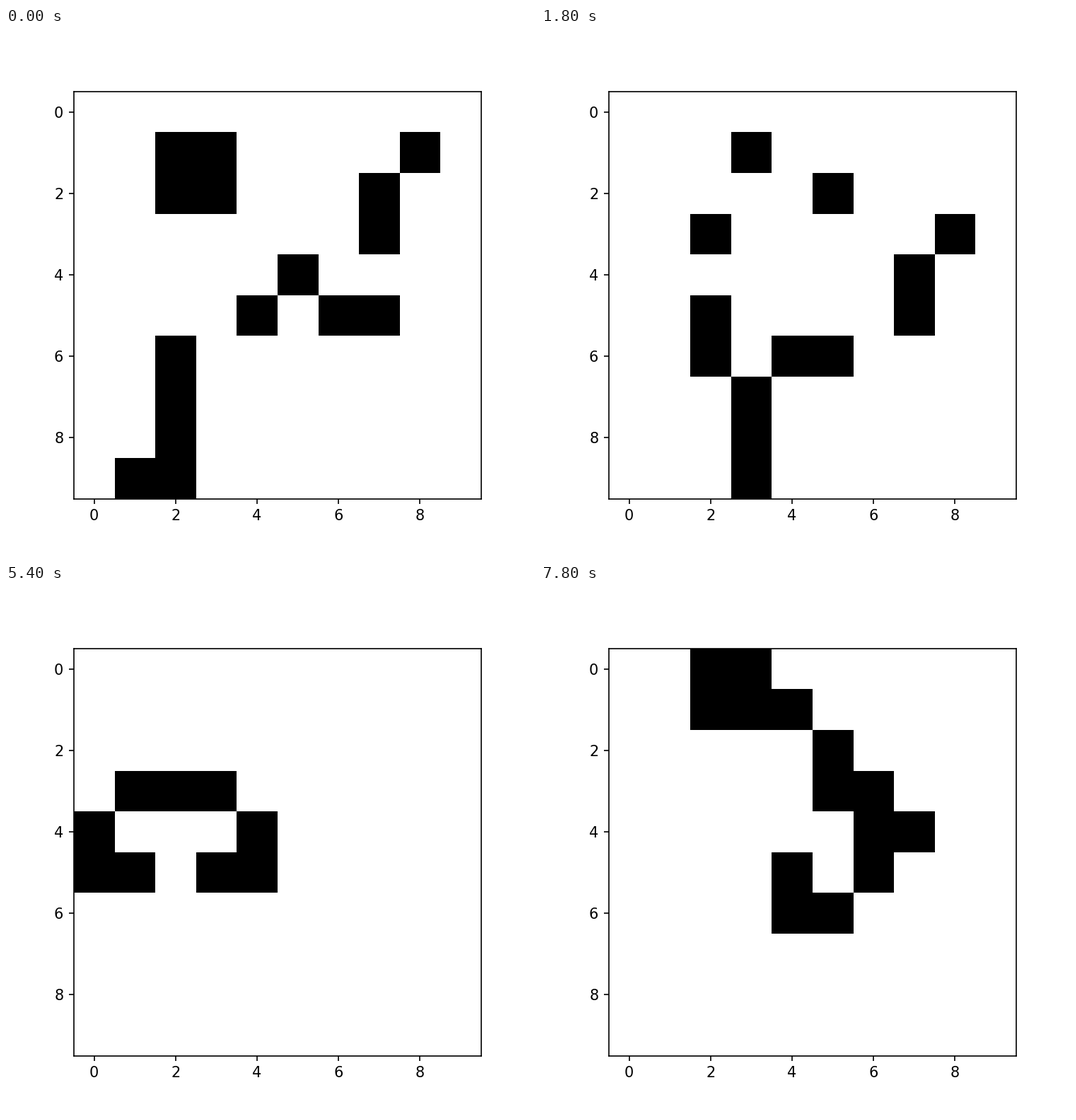
Recreate the animation shown at these times as a matplotlib script. Size 748 by 748 pixels, loop 8000 ms.

```python
import matplotlib.pyplot as plt
import numpy as np
from matplotlib.animation import FuncAnimation

SIZE = 10
STAGE = 748              # px
DPI = 150
INTERVAL = 100           # ms per frame
FRAMES = 80
FRAMES_PER_GENERATION = 3

START = """
..........
..##....#.
..##...#..
.......#..
.....#....
....#.##..
..#.......
..#.......
..#.......
.##.......
""".split()


def step(cells):
    """Advance Conway's Game of Life with dead cells beyond the border."""
    padded = np.pad(cells, 1)
    block = sum(padded[r:r + SIZE, c:c + SIZE] for r in range(3) for c in range(3))
    neighbours = block - cells
    return ((neighbours == 3) | ((cells == 1) & (neighbours == 2))).astype(int)


generations = [np.array([[int(ch == "#") for ch in row] for row in START])]
while len(generations) * FRAMES_PER_GENERATION < FRAMES:
    generations.append(step(generations[-1]))

plt.rcParams["font.family"] = "DejaVu Sans"
fig, ax = plt.subplots(figsize=(STAGE / DPI, STAGE / DPI), dpi=DPI)
# The default margins, measured on a canvas one pixel wider than the stage.
widen = (STAGE + 1) / STAGE
fig.subplots_adjust(left=0.125 * widen, right=0.9 * widen)
image = ax.imshow(generations[0], cmap="binary", vmin=0, vmax=1,
                  interpolation="nearest")
ax.set_xticks(range(0, SIZE, 2))
ax.set_yticks(range(0, SIZE, 2))


def update(frame):
    image.set_data(generations[frame // FRAMES_PER_GENERATION])
    return [image]


animation = FuncAnimation(fig, update, frames=FRAMES, interval=INTERVAL,
                          repeat=True, repeat_delay=0)
plt.show()
```
